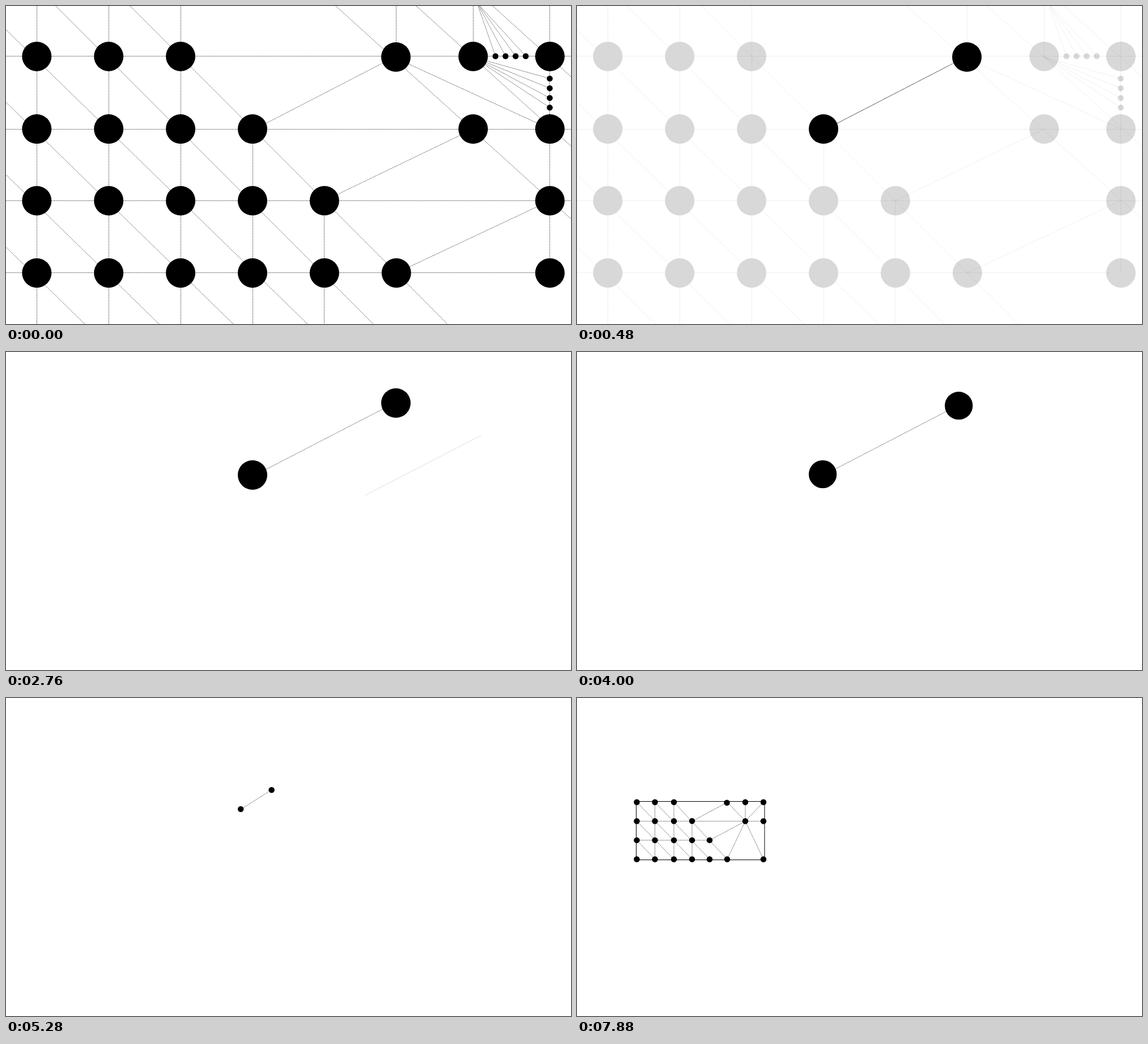
Recreate the animation shown at these times as an HTML page with a canvas. Size 997 by 561 pixels, loop 8 s.

```html
<!DOCTYPE html>
<html lang="en">
<head>
<meta charset="utf-8">
<title>Dotted network</title>
<style>
  html, body { margin: 0; width: 100%; height: 100%; overflow: hidden; background: #fff; }
  canvas { display: block; }
</style>
</head>
<body>
<canvas id="stage" width="997" height="561"></canvas>
<script>
const ctx = document.getElementById('stage').getContext('2d');
const W = 997, H = 561, LOOP = 8000, TICK = 40;
const BIG = 26, SMALL = 5.25, DOTS = [1, 1.5];

// Both networks share one layout of 8 columns and 4 rows
const big = {
  x: i => 54.3 + 126.9 * i + 8.6 * Math.max(0, i - 5),
  y: j => [88.9, 217, 343.5, 470.9][j]
};
const mini = {
  x: i => [105.5, 137.5, 171, 203, 234, 265, 297, 329][i],
  y: j => 183.7 + 33.6 * j
};
const onStairs = (i, j) => i <= j + 2;
const insideStairs = (i, j) => i < j + 2;
const onRight = (i, j) => i >= j + 5 || i === 7;
const inPair = (i, j) => (i === 3 && j === 1) || (i === 5 && j === 0);

// Poses of the highlighted pair: [leftX, leftY, rightX, rightY, radius]
const poses = [
  [435, 217, 688, 90, BIG],
  [414.2, 196, 468.6, 162.3, SMALL],
  [203, 217, 257.5, 183.4, SMALL],
  [203, 217, 264.5, 184.7, SMALL]
];
const moves = [[3640, 1680], [5320, 920], [6240, 1600]]; // start, duration

const clamp = v => Math.min(1, Math.max(0, v));
const ease = u => u < .5 ? .5 * (2 * u) ** 2.4 : 1 - .5 * (2 - 2 * u) ** 2.4;
const crisp = v => Math.floor(v) + .5;
const times = (n, fn) => { for (let k = 0; k < n; k++) fn(k); };

function line(x1, y1, x2, y2) {
  ctx.beginPath();
  ctx.moveTo(x1, y1);
  ctx.lineTo(x2, y2);
  ctx.stroke();
}

function disc(x, y, r) {
  ctx.beginPath();
  ctx.arc(x, y, r, 0, 2 * Math.PI);
  ctx.fill();
}

function link(net, i1, j1, i2, j2) {
  line(net.x(i1), net.y(j1), net.x(i2), net.y(j2));
}

function discs(net, r, test) {
  times(4, j => times(8, i => {
    if (test(i, j) && !inPair(i, j)) disc(net.x(i), net.y(j), r);
  }));
}

function drawStairs(alpha) {
  ctx.globalAlpha = alpha;
  times(4, j => line(0, crisp(big.y(j)), big.x(j + 2), crisp(big.y(j))));
  times(5, i => line(crisp(big.x(i)), i < 3 ? 0 : big.y(i - 2), crisp(big.x(i)), H));
  times(5, k => {
    const top = 88 - 131 * k;
    line(top, 0, top + (k ? 575 : 560), H);
  });
  // This part fades as one layer, so lines stay hidden behind its discs
  ctx.globalAlpha = 1;
  ctx.fillStyle = '#fff';
  discs(big, BIG, insideStairs);
  ctx.fillStyle = '#000';
  ctx.globalAlpha = alpha;
  discs(big, BIG, insideStairs);
}

function drawOpenPart(alpha) {
  ctx.globalAlpha = alpha;
  line(219, 0, 779, H);
  times(4, j => line(big.x(j + 2), crisp(big.y(j)), j < 3 ? W : 941, crisp(big.y(j))));
  times(3, k => line(crisp(big.x(5 + k)), 0, crisp(big.x(5 + k)), big.y(k < 2 ? 0 : 3)));
  for (const top of [582, 724, 859]) line(top, 0, top + H / .905, H);
  times(2, k => link(big, 6 + k, 1 + k, 4 + k, 2 + k));
  line(688, 92, 960, 217);
  times(4, k => {
    const x = 863.7 + 17.8 * k, y = 128 + 17.1 * k;
    line(831, -6, x, 88.5);
    line(824, 90, 959.5, y);
    disc(x, 88.5, SMALL);
    disc(959.5, y, SMALL);
  });
  discs(big, BIG, (i, j) => !insideStairs(i, j) && (onStairs(i, j) || onRight(i, j)));
}

function drawMini(alpha) {
  ctx.globalAlpha = alpha;
  link(mini, 0, 1, 7, 1);
  link(mini, 0, 2, 4, 2);
  times(3, k => link(mini, k + 1, k < 2 ? 0 : 1, k + 1, 3));
  for (let k = -2; k <= 2; k++) {
    link(mini, Math.max(k, 0), Math.max(-k, 0), k + 3, 3);
  }
  for (const [i, j] of [[5, 0], [6, 0], [7, 0], [4, 2], [5, 3], [7, 3]]) link(mini, 6, 1, i, j);
  ctx.setLineDash([]);
  ctx.strokeRect(104.5, 182.5, 226.5, 103);
  ctx.setLineDash(DOTS);
  discs(mini, SMALL, (i, j) => onStairs(i, j) || (onRight(i, j) && j !== 2));
}

function pairPose(t) {
  let pose = poses[0];
  moves.forEach(([start, duration], i) => {
    const p = ease(clamp((t - start) / duration));
    pose = pose.map((v, k) => v + (poses[i + 1][k] - v) * p);
  });
  return pose;
}

// A second line lies over the link, blinks once, then drifts away
function drawOverlay(t, fade) {
  if (t >= 2960 || (t >= 1560 && t < 1640)) return;
  const p = clamp((t - 2340) / 620);
  ctx.globalAlpha = (1 - fade) * (1 - p);
  ctx.save();
  ctx.translate(259 * p, 67 * p);
  line(459, 207, 663, 101.7);
  ctx.restore();
}

function draw(t) {
  ctx.clearRect(0, 0, W, H);
  ctx.lineWidth = 1;
  ctx.setLineDash(DOTS);

  const fade = t < 520 ? 1 - clamp((t - 104) / 444) : 0;
  if (fade > 0) {
    drawStairs(fade);
    drawOpenPart(fade);
  }
  if (t >= 7040) drawMini(clamp((t - 7000) / 840));

  const [lx, ly, rx, ry, r] = pairPose(t);
  ctx.globalAlpha = 1;
  line(lx, ly + .09 * r, rx, ry - .05 * r);
  drawOverlay(t, fade);
  ctx.globalAlpha = 1;
  disc(lx, ly, r);
  disc(rx, ry, r);
}

function frame() {
  draw(Math.floor(performance.now() % LOOP / TICK) * TICK);
  requestAnimationFrame(frame);
}
frame();
</script>
</body>
</html>
```
